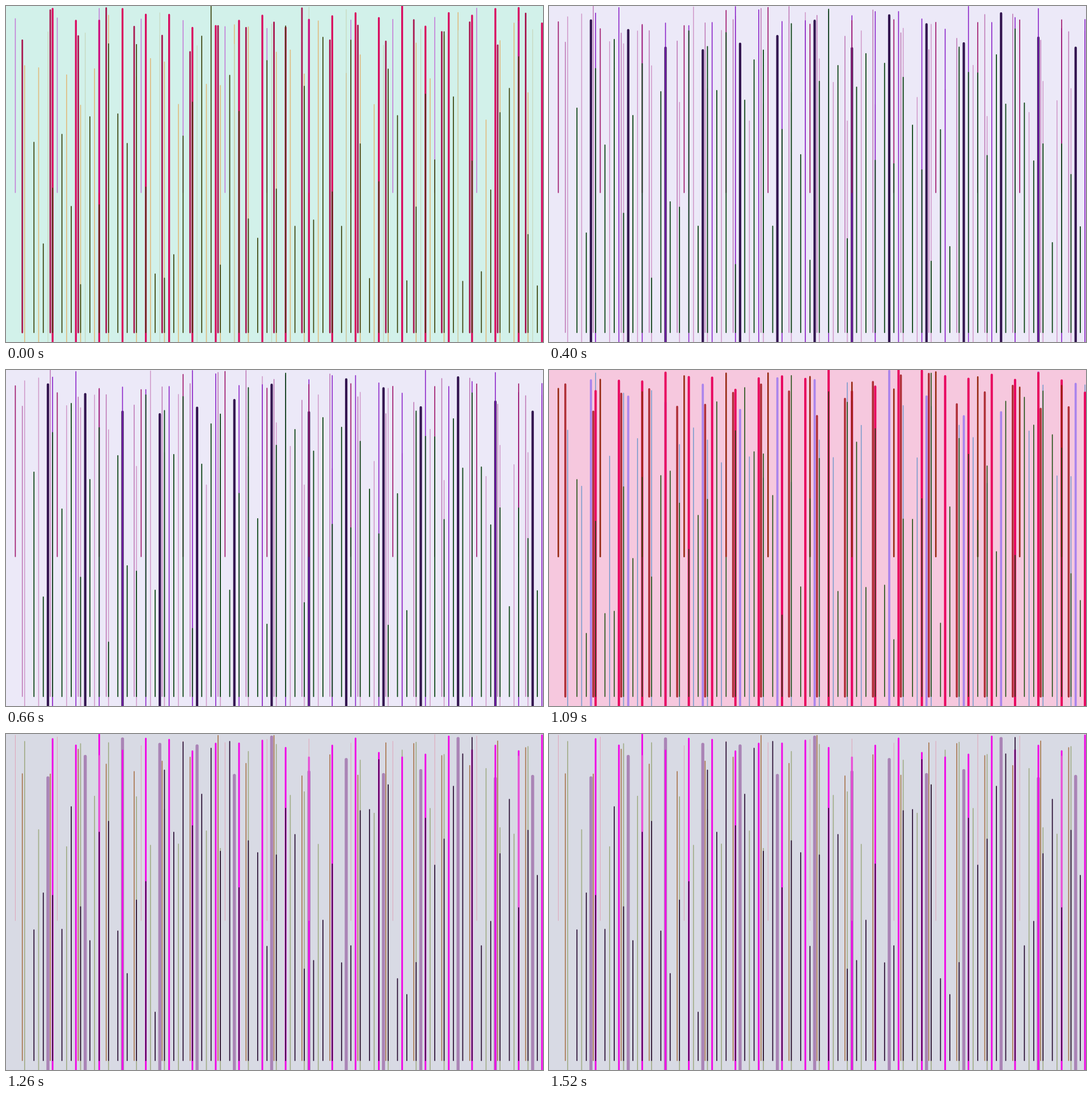
These frames come from a looping animation (947x592 px, 1690 ms). An HTML page:

```html
<!DOCTYPE html>
<html lang="en">
<head>
<meta charset="utf-8">
<title>Stripes</title>
<style>
  html, body { margin: 0; width: 100%; height: 100%; overflow: hidden; }
  #stage { display: block; width: 100%; height: 100%; }
  #strip { animation: cut 1690ms step-end infinite; }
  /* Hard cuts at 400, 830 and 1260 ms */
  @keyframes cut {
    0% { transform: translateX(0); }
    23.6686% { transform: translateX(-947px); }
    49.1124% { transform: translateX(-1894px); }
    74.5562% { transform: translateX(-2841px); }
    100% { transform: translateX(-2841px); }
  }
</style>
</head>
<body>
<svg id="stage" viewBox="0 0 947 592" preserveAspectRatio="none"><g id="strip"></g></svg>
<script>
const W = 947, H = 592, UNIT = 4.1095, COLUMNS = 231;
const NS = 'http://www.w3.org/2000/svg';

// Back to front, in grid units: first column, spacing, lowest top, bottom
const LAYERS = {
  thin:   { first: 8,  step: 6,  reach: 50,  bottom: 150 },
  wide:   { first: 18, step: 16, reach: 20,  bottom: 150 },
  mid:    { first: 7,  step: 12, reach: 20,  bottom: 140 },
  bright: { first: 20, step: 10, reach: 10,  bottom: 150 },
  short:  { first: 4,  step: 18, reach: 10,  bottom: 80 },
  stem:   { first: 12, step: 4,  reach: 120, bottom: 140 }
};

// Each layer is [colour, line width]; tops are for the free-standing stems
const SCENES = [
  {
    back: '#d2f1ea', seed: 11,
    thin: ['#e0ba7c', 1.6], wide: ['#c6d6bb', 1.2], mid: ['#a81850', 2.8],
    bright: ['#d90a5f', 3.3], short: ['#b81cc8', 1.6, .55], stem: ['#3a410a', 1.7],
    tops: [240, 419, 226, 353, 195, 190, 242, 472, 438, 229, 53, 0, 122, 409, 96,
      388, 377, 55, 388, 60, 480, 193, 484, 271, 160, 485, 468, 324, 145, 493]
  },
  {
    back: '#ece9f8', seed: 23,
    thin: ['#cf96c8', 1.5], wide: ['#331550', 4.2], mid: ['#bd74b4', 1.5],
    bright: ['#8a22c8', 1.6], short: ['#a01a6e', 1.7], stem: ['#0d4515', 1.8],
    tops: [180, 400, 245, 59, 193, 151, 345, 388, 149, 47, 166, 95, 388, 262, 448,
      105, 143, 84, 101, 278, 210, 218, 424, 118, 86, 173, 171, 273, 417, 389]
  },
  {
    back: '#f6c8de', seed: 37,
    thin: ['#7a9ccc', 1.6], wide: ['#ab85ec', 3.8], mid: ['#b03038', 3.6],
    bright: ['#e8065f', 4], short: ['#96280f', 2.6], stem: ['#1c4f10', 1.6],
    tops: [193, 464, 429, 425, 332, 186, 178, 256, 56, 330, 31, 144, 221, 382, 227,
      390, 127, 383, 379, 475, 263, 446, 241, 265, 320, 55, 48, 97, 114, 406]
  },
  {
    back: '#d8dae4', seed: 53,
    thin: ['#a2ad88', 1.7], wide: ['#aa84b6', 5.4], mid: ['#a9774f', 1.7],
    bright: ['#f00ae6', 3], short: ['#e0a3b8', 1], stem: ['#260a30', 1.7],
    tops: [345, 280, 344, 128, 364, 347, 422, 490, 173, 14, 106, 25, 13, 209, 374,
      177, 399, 328, 403, 373, 133, 431, 459, 231, 92, 35, 373, 330, 115, 249]
  }
];

function seededRandom(seed) {
  return () => {
    seed = (seed + 0x6D2B79F5) | 0;
    let t = Math.imul(seed ^ (seed >>> 15), seed | 1);
    t ^= t + Math.imul(t ^ (t >>> 7), t | 61);
    return ((t ^ (t >>> 14)) >>> 0) / 4294967296;
  };
}

function add(parent, tag, attributes) {
  const node = document.createElementNS(NS, tag);
  for (const [key, value] of Object.entries(attributes)) node.setAttribute(key, value);
  return parent.appendChild(node);
}

// Stems that share no column with a bright or thin line
const standsFree = column => column % 20 !== 0 && column % 12 !== 8;

function drawScene(scene, index) {
  const view = add(document.getElementById('strip'), 'svg', { x: index * W, width: W, height: H });
  add(view, 'rect', { width: W, height: H, fill: scene.back });
  const random = seededRandom(scene.seed);
  const tops = scene.tops.values();

  for (const [name, layer] of Object.entries(LAYERS)) {
    const [colour, width, opacity = 1] = scene[name];
    let path = '';
    for (let column = layer.first; column < COLUMNS; column += layer.step) {
      const top = name === 'stem' && standsFree(column)
        ? tops.next().value
        : random() * layer.reach * UNIT;
      path += `M${(column * UNIT).toFixed(2)} ${top.toFixed(1)}V${layer.bottom * UNIT}`;
    }
    add(view, 'path', {
      d: path, fill: 'none', stroke: colour, 'stroke-width': width,
      'stroke-opacity': opacity, 'stroke-linecap': 'round'
    });
  }
}

SCENES.forEach(drawScene);
</script>
</body>
</html>
```
